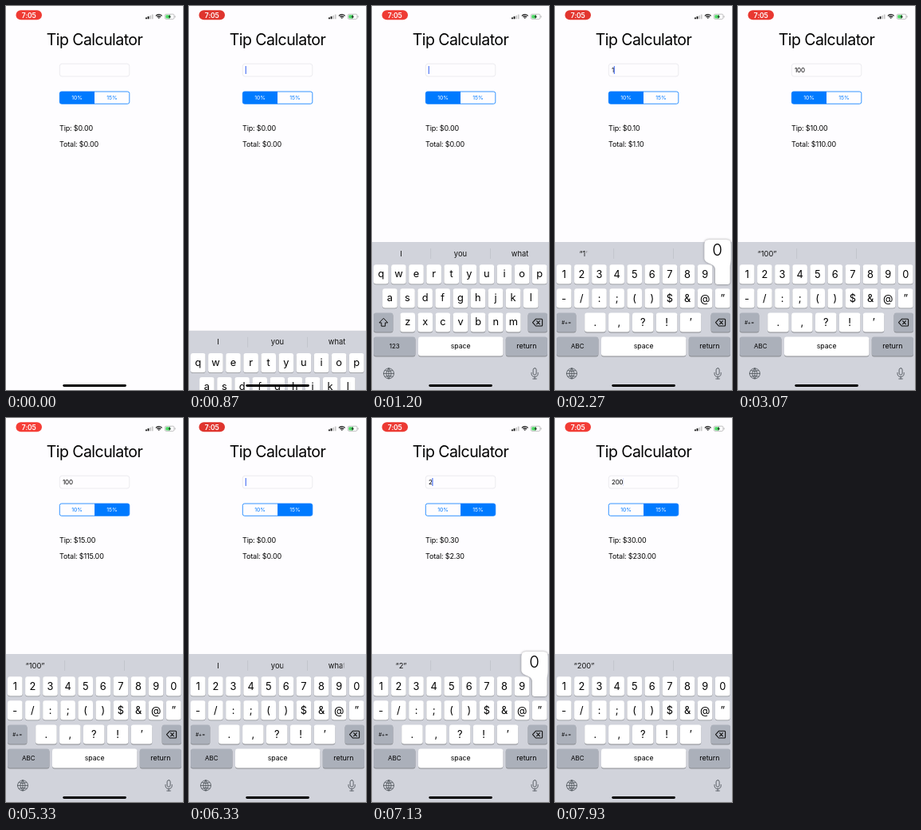
Write an HTML page with a canvas that moves like this. It is 222 by 480 pixels and loops after 8 s.

```html
<!DOCTYPE html>
<html lang="en">
<head>
<meta charset="utf-8">
<title>Tip Calculator</title>
<style>
html, body { margin: 0; width: 100%; height: 100%; overflow: hidden; background: #fefdff; }
canvas { display: block; width: 100vw; height: 100vh; }
</style>
</head>
<body>
<canvas></canvas>
<script>
const W = 222, H = 480, LOOP = 8000;
const PAGE = '#fefdff', BLUE = '#007aff', KEY = '#fff', DARK_KEY = '#abb0ba', ICON = '#50555c';
const canvas = document.querySelector('canvas');
const c = canvas.getContext('2d');

// Timeline, in ms
const KEYBOARD_UP = 808, SLIDE = 400, TO_NUMBERS = 1600, PICK_15 = 4130;
const WIPE_DELAY = 70, WIPE = 170;
const presses = [
  { key: '123', down: 1530, up: TO_NUMBERS },
  { key: '1', down: 1980, up: 2100 },
  { key: '0', down: 2230, up: 2330 },
  { key: '0', down: 2410, up: 2500 },
  { key: '15%', down: 4000, up: PICK_15 },
  { key: 'del', down: 5640, up: 5730 },
  { key: 'del', down: 5890, up: 5970 },
  { key: 'del', down: 6130, up: 6220 },
  { key: '2', down: 6800, up: 6900 },
  { key: '0', down: 7070, up: 7170 },
  { key: '0', down: 7290, up: 7390 }
];

// Every value of the field, with the time it appears
const edits = [{ at: KEYBOARD_UP, value: '' }];
for (const { key, down, up } of presses) {
  const value = edits[edits.length - 1].value;
  if (key === 'del') edits.push({ at: down, value: value.slice(0, -1) });
  else if (/^\d$/.test(key)) edits.push({ at: up, value: value + key });
}

const clamp = (v, lo = 0, hi = 1) => Math.min(hi, Math.max(lo, v));
const lastEdit = t => edits.filter(e => e.at <= t).pop() || edits[0];

function text(str, x, y, size, { color = '#000', align = 'center', spacing = 0, weight = 400 } = {}) {
  c.font = `${weight} ${size}px Inter, Roboto, sans-serif`;
  c.letterSpacing = spacing + 'px';
  c.textAlign = align;
  c.fillStyle = color;
  c.fillText(str, x, y);
  return c.measureText(str).width;
}

function box(x, y, w, h, r, fill, stroke, line = 0.6) {
  c.beginPath();
  c.roundRect(x, y, w, h, r);
  if (fill) { c.fillStyle = fill; c.fill(); }
  if (stroke) { c.strokeStyle = stroke; c.lineWidth = line; c.stroke(); }
}

function stroke(path, color, line = 0.8) {
  c.strokeStyle = color;
  c.lineWidth = line;
  c.lineJoin = c.lineCap = 'round';
  c.stroke(new Path2D(path));
}

function statusBar(t) {
  const pulse = Math.cos((t - 1600) / 1000 * Math.PI);
  box(12.5, 5.3, 32.5, 12, 6, `rgb(${234 + 16 * pulse}, ${57 + 6 * pulse}, ${50 + 6 * pulse})`);
  text('7:05', 28.8, 14.7, 8.6, { color: '#fff', weight: 600, spacing: -0.1 });

  for (let i = 0; i < 4; i++) {
    const h = 2 + i * 1.3;
    box(175 + i * 2.6, 16.3 - h, 1.8, h, 0.4, i < 2 ? '#111' : '#c8c8c8');
  }
  c.lineCap = 'butt';
  c.strokeStyle = '#111';
  c.lineWidth = 1.3;
  for (const r of [1, 3.1, 5.3]) {
    c.beginPath();
    c.arc(191.8, 16, r, -Math.PI * 0.76, -Math.PI * 0.24);
    c.stroke();
  }
  box(199.3, 10.2, 11.6, 6.2, 1.6, null, '#9b9b9b');
  box(200.3, 11.2, 5.8, 4.2, 0.8, '#4cd964');
  box(211.6, 12.2, 0.8, 2.2, 0.4, '#9b9b9b');
  c.fillStyle = '#222';
  c.fill(new Path2D('M206 10.8 L203.4 13.7 H205 L204.4 15.9 L207 12.9 H205.4 Z'));
}

function segments(picked, pressed) {
  const x = 67.3, y = 107, w = 87.5, h = 15.3, half = w / 2;
  ['10%', '15%'].forEach((label, i) => {
    const fill = i === picked ? BLUE : pressed && i ? '#d6e9fd' : PAGE;
    box(x + i * half, y, half, h, i ? [0, 2.4, 2.4, 0] : [2.4, 0, 0, 2.4], fill);
    text(label, x + half * (i + 0.5), 117.2, 6.8, { color: i === picked ? '#fff' : BLUE });
  });
  box(x, y, w, h, 2.4, null, BLUE, 0.8);
}

function form(t, value, since, held) {
  text('Tip Calculator', 111, 48.5, 19.5, { spacing: -0.55 });

  box(67.3, 72.2, 87.5, 15.8, 3, PAGE, '#dfe0e4');
  const width = value ? text(value, 71, 82.9, 8, { align: 'left', spacing: -0.2 }) : 0;
  if (t >= KEYBOARD_UP) {
    const phase = since % 1000;
    c.globalAlpha = phase < 500 ? clamp((phase + (since < 1000 ? 60 : 0)) / 60) : clamp((550 - phase) / 50);
    box(70.7 + width, 75, 1.1, 10, 0.5, '#426bf2');
    c.globalAlpha = 1;
  }

  const picked = t >= PICK_15 ? 1 : 0;
  segments(picked, held === '15%');
  const bill = Number(value), tip = bill * (picked ? 0.15 : 0.1);
  const style = { align: 'left', spacing: -0.15 };
  text('Tip: $' + tip.toFixed(2), 67, 156.3, 9, style);
  text('Total: $' + (bill + tip).toFixed(2), 67, 176.3, 9, style);
}

function key(x, y, w, label, size, fill = KEY, drop = 4.6) {
  box(x, y + 0.8, w, 24.2, 3, '#898b90');
  box(x, y, w, 24.2, 3, fill);
  if (label) text(label, x + w / 2, y + 12 + drop, size);
}

function keyRow(labels, x, y, drop, pitch = 22.1, w = 18.6) {
  [...labels].forEach((label, i) => key(x + i * pitch, y, w, label, 12.8, KEY, drop));
}

// Words wipe in from left to right
function suggestions(t) {
  const { at, value } = lastEdit(t - WIPE_DELAY);
  const p = at === KEYBOARD_UP ? 1 : clamp((t - at - WIPE_DELAY) / WIPE);
  const words = value ? [`\u201c${value}\u201d`] : ['I', 'you', 'what'];
  words.forEach((word, i) => {
    const x = 36.5 + i * 74.5;
    const wipe = c.createLinearGradient(x - 12, 0, x + 12, 0);
    const edge = p * 1.2;
    wipe.addColorStop(clamp(edge - 0.2), '#111');
    wipe.addColorStop(clamp(edge), p < 1 ? 'rgba(17,17,17,0)' : '#111');
    text(word, x, 312.8, 9.4, { color: wipe });
  });
  for (const x of [73.5, 148]) box(x, 303, 0.6, 13, 0, '#b9bcc3');
}

function popup(digit) {
  const x = 2 + 22.1 * ((Number(digit) + 9) % 10), end = x + 18.6;
  const left = clamp(x - 7.2, 1, 187.3), right = left + 33.4;
  const shape = new Path2D(`M${left + 6} 292 H${right - 6} Q${right} 292 ${right} 298 V315
    C${right} 323 ${end} 321 ${end} 329 V345 Q${end} 348 ${end - 3} 348
    H${x + 3} Q${x} 348 ${x} 345 V329 C${x} 321 ${left} 323 ${left} 315
    V298 Q${left} 292 ${left + 6} 292 Z`);
  c.save();
  c.shadowColor = 'rgba(0,0,0,.4)';
  c.shadowBlur = 3;
  c.fillStyle = '#fff';
  c.fill(shape);
  c.restore();
  text(digit, left + 16.2, 312, 20.5, { weight: 300 });
}

function keyboard(t, held) {
  const numbers = t >= TO_NUMBERS;
  box(0, 295, W, 190, 0, '#d1d3db');
  suggestions(t);

  if (numbers) {
    keyRow('1234567890', 2, 323.3, 4.6);
    keyRow('-/:;()$&@\u201d', 2, 353.3, 4.6);
    keyRow('.,?!\u2019', 37.2, 383.4, 4.6, 29.9, 26.5);
    key(2, 383.4, 24.4, '#+=', 6.2, DARK_KEY, 2.3);
  } else {
    keyRow('qwertyuiop', 2, 323.3, 4);
    keyRow('asdfghjkl', 13.1, 353.3, 4);
    keyRow('zxcvbnm', 35.4, 383.4, 4);
    key(2, 383.4, 24.4, '', 0, DARK_KEY);
    stroke('M14.2 390.6 L9 395.9 H11.8 V400.2 H16.6 V395.9 H19.4 Z', '#111', 1);
  }

  key(195.6, 383.4, 24.4, '', 0, held === 'del' ? KEY : DARK_KEY);
  stroke('M205.4 391.3 H212.6 Q213.6 391.3 213.6 392.3 V399 Q213.6 400 212.6 400 H205.4 L201.5 395.6 Z M206.6 393.7 L210.4 397.6 M210.4 393.7 L206.6 397.6', '#111', 1.1);

  key(2, 413.4, 52.4, numbers ? 'ABC' : '123', 8, held === '123' ? KEY : DARK_KEY, 2.6);
  key(58, 413.4, 106.4, 'space', 8.7, KEY, 2.2);
  key(167.8, 413.4, 52.2, 'return', 8.9, DARK_KEY, 2.6);

  // Globe and microphone
  stroke('M14.5 459.4 a6.5 6.5 0 1 0 13 0 a6.5 6.5 0 1 0 -13 0 M14.5 459.4 H27.5 M21 452.9 V465.9 M21 452.9 Q14.6 459.4 21 465.9 Q27.4 459.4 21 452.9 M16.2 455.6 Q21 457.8 25.8 455.6 M16.2 463.2 Q21 461 25.8 463.2', ICON, 0.85);
  box(202.1, 452.7, 4, 8.4, 2, null, ICON, 0.9);
  stroke('M200 458.4 V459.4 Q200 463.4 204.1 463.4 Q208.2 463.4 208.2 459.4 V458.4 M204.1 463.4 V466 M201.8 466 H206.4', ICON, 0.9);

  if (/^\d$/.test(held)) popup(held);
}

function draw(t) {
  const press = presses.find(p => t >= p.down && t < p.up);
  const held = press ? press.key : '';
  const { at, value } = lastEdit(t);

  c.fillStyle = PAGE;
  c.fillRect(0, 0, W, H);
  statusBar(t);
  form(t, value, t - at, held);

  if (t >= KEYBOARD_UP) {
    const left = 1 - clamp((t - KEYBOARD_UP) / SLIDE);
    c.save();
    c.translate(0, 185 * left ** 3);
    keyboard(t, held);
    c.restore();
  }
  box(71.3, 473, 79.6, 2.9, 1.45, '#000');
}

function frame() {
  const ratio = window.devicePixelRatio || 1;
  const w = Math.round(innerWidth * ratio), h = Math.round(innerHeight * ratio);
  if (canvas.width !== w || canvas.height !== h) {
    canvas.width = w;
    canvas.height = h;
  }
  c.setTransform(w / W, 0, 0, h / H, 0, 0);
  draw(performance.now() % LOOP);
  requestAnimationFrame(frame);
}
frame();
</script>
</body>
</html>
```
